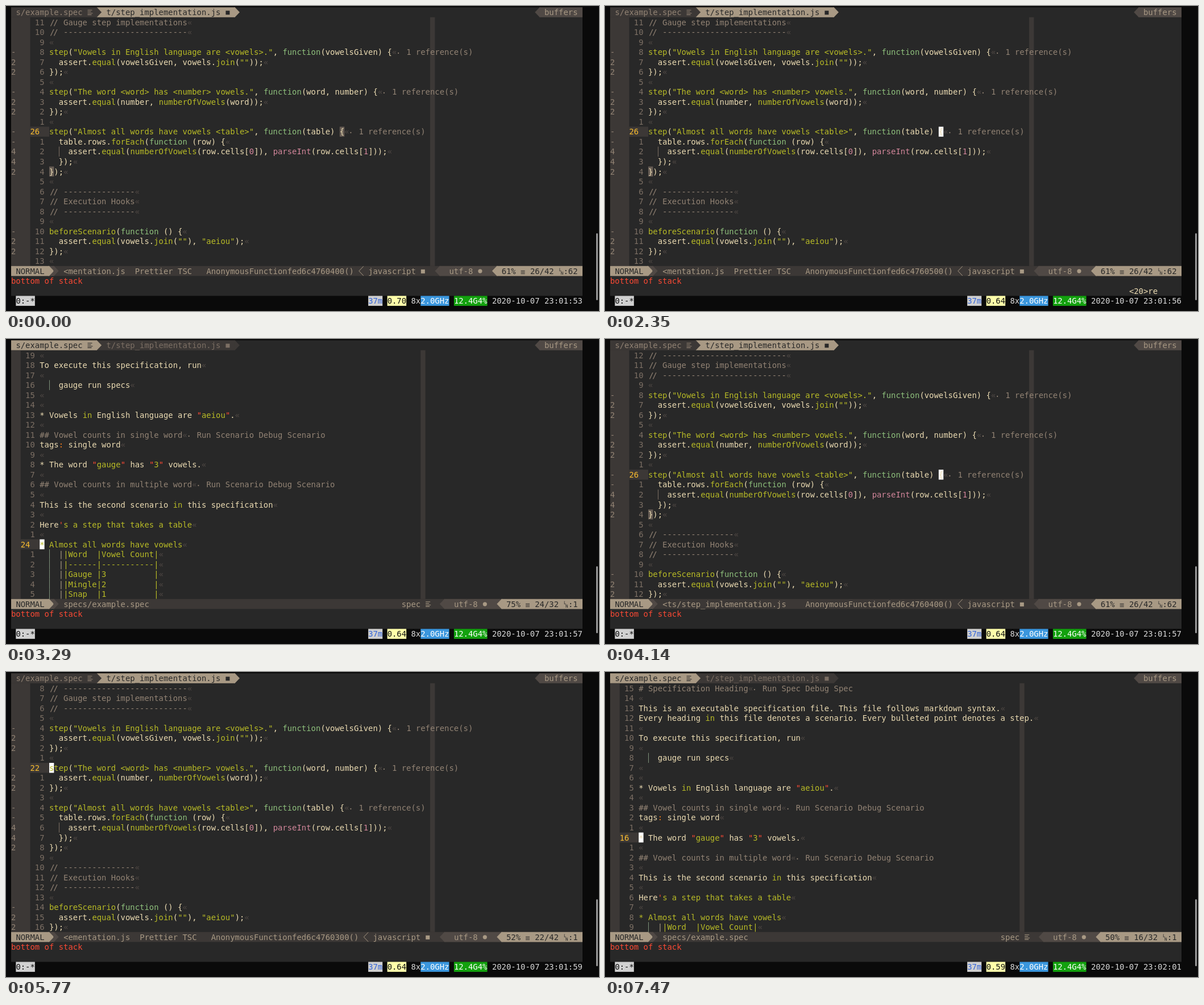
Recreate the animation shown at these times as an HTML page. Size 1043 by 537 pixels, loop 8000 ms.

```html
<!DOCTYPE html>
<html lang="en">
<head>
<meta charset="utf-8">
<title>Editor session</title>
<style>
html, body { margin: 0; width: 100%; height: 100%; overflow: hidden; background: #0a0a0a; }
svg { display: block; width: 100vw; height: 100vh; }
text { font: 13.911px "DejaVu Sans Mono", "Noto Sans Mono", monospace; white-space: pre; }
.tight { letter-spacing: -2.4px; }
.small { font-size: 7.5px; }
</style>
</head>
<body>
<svg id="stage" viewBox="0 0 1043 537" preserveAspectRatio="xMinYMin meet"></svg>
<script>
const LOOP = 8000, CW = 8.375, CH = 17.52, LEFT = 9, TOP = 2.3, BASE = 13.9;
const BG = '#282828', BG1 = '#3c3836', BG2 = '#504945', BG3 = '#665c54', BG4 = '#7c6f64';
const FG = '#ebdbb2', FG4 = '#a89984', GRAY = '#928374', RED = '#fb4934', GREEN = '#b8bb26';
const YELLOW = '#fabd2f', PURPLE = '#d3869b', AQUA = '#8ec07c', ORANGE = '#fe8019';

const dashes = n => '// ' + '-'.repeat(n);
const js = {
  first: 14, total: 42, gutter: 4, lens: { 18: 1, 22: 1, 26: 1 },
  folds: '    -22 -22 --442     -22 ',
  lines: [
    dashes(26), '// Gauge step implementations', dashes(26), '',
    'step("Vowels in English language are <vowels>.", function(vowelsGiven) {',
    '  assert.equal(vowelsGiven, vowels.join(""));', '});', '',
    'step("The word <word> has <number> vowels.", function(word, number) {',
    '  assert.equal(number, numberOfVowels(word));', '});', '',
    'step("Almost all words have vowels <table>", function(table) {',
    '  table.rows.forEach(function (row) {',
    '    assert.equal(numberOfVowels(row.cells[0]), parseInt(row.cells[1]));',
    '  });', '});', '',
    dashes(15), '// Execution Hooks', dashes(15), '',
    'beforeScenario(function () {', '  assert.equal(vowels.join(""), "aeiou");', '});', ''
  ]
};
const spec = {
  first: 1, total: 32, gutter: 2, lens: { 1: 'Spec', 13: 'Scenario', 18: 'Scenario' }, folds: '',
  lines: [
    '# Specification Heading', '',
    'This is an executable specification file. This file follows markdown syntax.',
    'Every heading in this file denotes a scenario. Every bulleted point denotes a step.', '',
    'To execute this specification, run', '', '    gauge run specs', '', '',
    '* Vowels in English language are "aeiou".', '',
    '## Vowel counts in single word', 'tags: single word', '',
    '* The word "gauge" has "3" vowels.', '',
    '## Vowel counts in multiple word', '',
    'This is the second scenario in this specification', '',
    "Here's a step that takes a table", '',
    '* Almost all words have vowels',
    '     |Word  |Vowel Count|', '     |------|-----------|',
    '     |Gauge |3          |', '     |Mingle|2          |', '     |Snap  |1          |'
  ]
};

// time, file, top line, cursor line, cursor column, function number, long path
const moves = [
  [0, js, 15, 26, 62, 4], [990, js, 15, 27, 37, 4], [1050, js, 15, 27, 37, 5],
  [1420, js, 15, 26, 62, 5], [2590, spec, 5, 24, 1],
  [4140, js, 14, 26, 62, 4, true], [4220, js, 14, 26, 62, 4],
  [4840, js, 14, 25, 1, 4], [4920, js, 14, 24, 3, 3], [5070, js, 14, 23, 45, 3],
  [5230, js, 14, 22, 62, 3], [5770, js, 14, 22, 1, 3], [6160, js, 14, 22, 2, 3],
  [6400, js, 14, 22, 3, 3], [6470, js, 14, 22, 4, 3], [7240, spec, 1, 16, 1]
];
const keys = [[0, ''], [2040, '<20>'], [2270, '<20>r'], [2350, '<20>re'], [2590, ''],
  [6700, '<20>'], [6930, '<20>r'], [7010, '<20>re'], [7240, '']];
const loads = [[0, '0.70'], [1190, '0.64'], [7470, '0.59']];
const ticks = [250, 1050, 2270, 3290, 4220, 5230, 6240, 7320];

const last = (list, t) => list.filter(e => e[0] <= t).pop();
const x = c => LEFT + c * CW, y = r => TOP + r * CH;
const escape = s => s.replace(/&/g, '&amp;').replace(/</g, '&lt;');
let out;

function box(x0, y0, w, h, fill, extra = '') {
  out += `<rect x="${x0}" y="${y0}" width="${w}" height="${h}" fill="${fill}" ${extra}/>`;
}
function cells(r, c, n, fill, rows = 1) {
  box(x(c), y(r), n * CW, rows * CH, fill);
}
function put(r, c, s, fill, cls = '', dx = 0, dy = 0) {
  if (!s.trim()) return;
  out += `<text x="${x(c) + dx}" y="${y(r) + BASE + dy}" fill="${fill}" class="${cls}">${escape(s)}</text>`;
}
// The base reaches one pixel under the neighbouring cell to hide the seam.
function arrow(r, c, dir, fill) {
  const back = x(dir > 0 ? c : c + 1), tip = back + dir * CW;
  out += `<path d="M${back - dir} ${y(r)}H${back}L${tip} ${y(r + .5)}L${back} ${y(r + 1)}h${-dir}z" fill="${fill}"/>`;
}
function bars(r, c, widths, top, gap, stroke) {
  const d = widths.map((w, i) => `M${x(c) + .5} ${y(r) + top + i * gap}h${w}`).join('');
  out += `<path d="${d}" stroke="${stroke}" stroke-width="1.1"/>`;
}
const textIcon = (r, c, color) => bars(r, c, [8, 6, 9, 7], 5, 2.7, color);
const square = (r, c, color) => box(x(c) + .6, y(r) + 6, 7, 7, color);

function jsColor(s) {
  if (s.startsWith('//')) return [[s, GRAY]];
  return s.split(/("[^"]*"|\bfunction\b|\w+(?=\()|\b\d\b)/).map(p => [p,
    p === 'function' ? AQUA : p === 'parseInt' || /^\d$/.test(p) ? PURPLE :
    p[0] === '"' || /^(step|equal|join|forEach|numberOfVowels|beforeScenario)$/.test(p) ? GREEN : FG]);
}
function specColor(s, n) {
  if (s[0] === '#') return [[s, GRAY]];
  if (n > 22) return [[s, GREEN]];
  let quoted = false;
  return s.split(/(["':]|\bin\b)/).map(p => {
    if (p === '"' || p === "'") { quoted = !quoted; return [p, RED]; }
    return [p, quoted || p === 'in' ? GREEN : p === ':' ? ORANGE : FG];
  });
}

function codeLine(file, n, r, c) {
  const s = file.lines[n - file.first], isJs = file === js;
  let at = c;
  for (const [part, color] of isJs ? jsColor(s) : specColor(s, n)) {
    if (part.startsWith('//')) {
      put(r, at, '//', color, 'tight', 1.2);
      put(r, at + 2, part.slice(2), color);
    } else {
      const pad = part.length - part.trimStart().length;
      put(r, at + pad, part.slice(pad), color);
    }
    at += part.length;
  }
  put(r, at, '«', BG2);
  const lens = file.lens[n];
  if (lens) {
    put(r, at + 1, '·', GRAY, '', -1.5, 2);
    put(r, at + 3, isJs ? '1 reference(s)' : `Run ${lens} Debug ${lens}`, GRAY);
  }
  if (/^ {4}/.test(s)) {
    box(Math.round(x(c + 2)), y(r), 1, CH, isJs ? BG4 : '#7c8f78');
    if (s[4] === ' ') put(r, c + 4, '|', FG4);
  }
}

function editor(t, file, top, line, col) {
  const g = file.gutter, c = g + 4;
  cells(1, 0, g, BG1, 25);
  cells(1, c + 80, 1, BG1, 25);
  cells(line - top + 1, g, 4, BG1);

  const text = n => file.lines[n - file.first];
  const under = text(line)[col - 1];
  if (under === '{') {
    const indent = text(line).search(/\S/);
    let close = line + 1;
    while (text(close).search(/\S/) !== indent) close++;
    cells(close - top + 1, c + indent, 1, BG3);
  }
  cells(line - top + 1, c + col - 1, 1, t < 990 ? BG3 : '#fff');

  for (let r = 1; r <= 25; r++) {
    const n = top + r - 1, here = n === line;
    put(r, 0, file.folds[n - file.first] || '', GRAY);
    put(r, g, here ? String(n) : String(Math.abs(n - line)).padStart(3), here ? YELLOW : BG4);
    codeLine(file, n, r, c);
  }
}

function tabs(isJs) {
  const first = isJs ? GRAY : BG, second = isJs ? BG : BG4;
  const bg = isJs ? [BG1, FG4] : [FG4, BG1];
  cells(0, 0, 18, bg[0]);
  cells(0, 18, 29, bg[1]);
  arrow(0, 18, 1, bg[0]);
  arrow(0, 47, 1, bg[1]);
  put(0, 1, 's/example.spec', first);
  textIcon(0, 16, first);
  put(0, 20, 't/step_implementation.js', second);
  square(0, 45, second);
  arrow(0, 110, -1, BG2);
  cells(0, 111, 9, BG2);
  put(0, 112, 'buffers', FG4);
}

function status(file, line, col, fn, longPath) {
  const r = 26, isJs = file === js, s = col < 10 ? 1 : 0;
  cells(r, 0, 120, BG1);
  cells(r, 0, 8, FG4);
  cells(r, 8, 1, BG2);
  arrow(r, 8, 1, FG4);
  arrow(r, 9, 1, BG2);
  put(r, 1, 'NORMAL', BG);
  if (isJs) {
    put(r, 11, '<' + 'tests/step_implementation.js'.slice(longPath ? -25 : -12 - s), FG4);
    if (!longPath) put(r, 26 + s, 'Prettier TSC', FG4);
    put(r, 41 + s, `AnonymousFunctionfed6c4760${fn}00()`, FG4);
    const cx = x(73 + s);
    out += `<path d="M${cx + CW} ${y(r) + .5}L${cx + .5} ${y(r + .5)}L${cx + CW} ${y(r + 1) - .5}" fill="none" stroke="${FG4}"/>`;
    put(r, 75 + s, 'javascript', FG4);
    square(r, 86 + s, FG4);
  } else {
    put(r, 11, 'specs/example.spec', FG4);
    put(r, 82, 'spec', FG4);
    textIcon(r, 87, FG4);
  }
  arrow(r, 89 + s, -1, BG2);
  cells(r, 90 + s, 30 - s, BG2);
  put(r, 92 + s, 'utf-8', FG4);
  out += `<circle cx="${x(98.5 + s)}" cy="${y(r) + 9}" r="3.6" fill="${FG4}"/>`;
  arrow(r, 101 + s, -1, FG4);
  cells(r, 102 + s, 18 - s, FG4);
  put(r, 103 + s, Math.floor(line * 100 / file.total) + '%', BG);
  bars(r, 107 + s, [7, 7, 7], 8.5, 2.5, BG);
  put(r, 109 + s, `${line}/${file.total}`, BG);
  put(r, 115 + s, 'L', BG, 'small', .5, -4.5);
  put(r, 115 + s, 'N', BG, 'small', 3.6, 1.5);
  put(r, 116 + s, ':' + col, BG);
}

function sessionBar(load, second) {
  const tag = (c, s, bg, fg) => { cells(29, c, s.length, bg); put(29, c, s, fg); };
  tag(1, '0:-*', '#d0d0d0', '#111');
  tag(75, '37m', '#d0d0d0', '#3465d9');
  tag(79, load, '#ffffaa', '#111');
  put(29, 84, '8x', '#d9d9d9');
  tag(86, '2.0GHz', '#3a96dd', '#fff');
  tag(93, '12.4G4%', '#13a10e', '#fff');
  const mm = second < 60 ? '01' : '02', ss = String(second % 60).padStart(2, '0');
  put(29, 101, `2020-10-07 23:${mm}:${ss}`, '#d9d9d9');
}

function render(t) {
  const [, file, top, line, col, fn, longPath] = last(moves, t);
  out = '';
  box(0, 0, 1043, 537, '#0a0a0a');
  cells(0, 0, 120, BG, 29);
  tabs(file === js);
  editor(t, file, top, line, col);
  status(file, line, col, fn, longPath);
  put(27, 0, 'bottom of stack', RED);
  put(28, 109, last(keys, t)[1], FG);
  sessionBar(last(loads, t)[1], 53 + ticks.filter(k => k <= t).length);
  box(1038, 400, 3, 118, '#9a9a9a', 'rx="1.5"');
  return out;
}

const stage = document.getElementById('stage');
const times = [...new Set([...moves, ...keys, ...loads].map(e => e[0]).concat(ticks))].sort((a, b) => a - b);
let shown = -1;
function frame() {
  const t = performance.now() % LOOP;
  const step = times.filter(k => k <= t).pop();
  if (step !== shown) {
    stage.innerHTML = render(step);
    shown = step;
  }
  requestAnimationFrame(frame);
}
frame();
</script>
</body>
</html>
```
